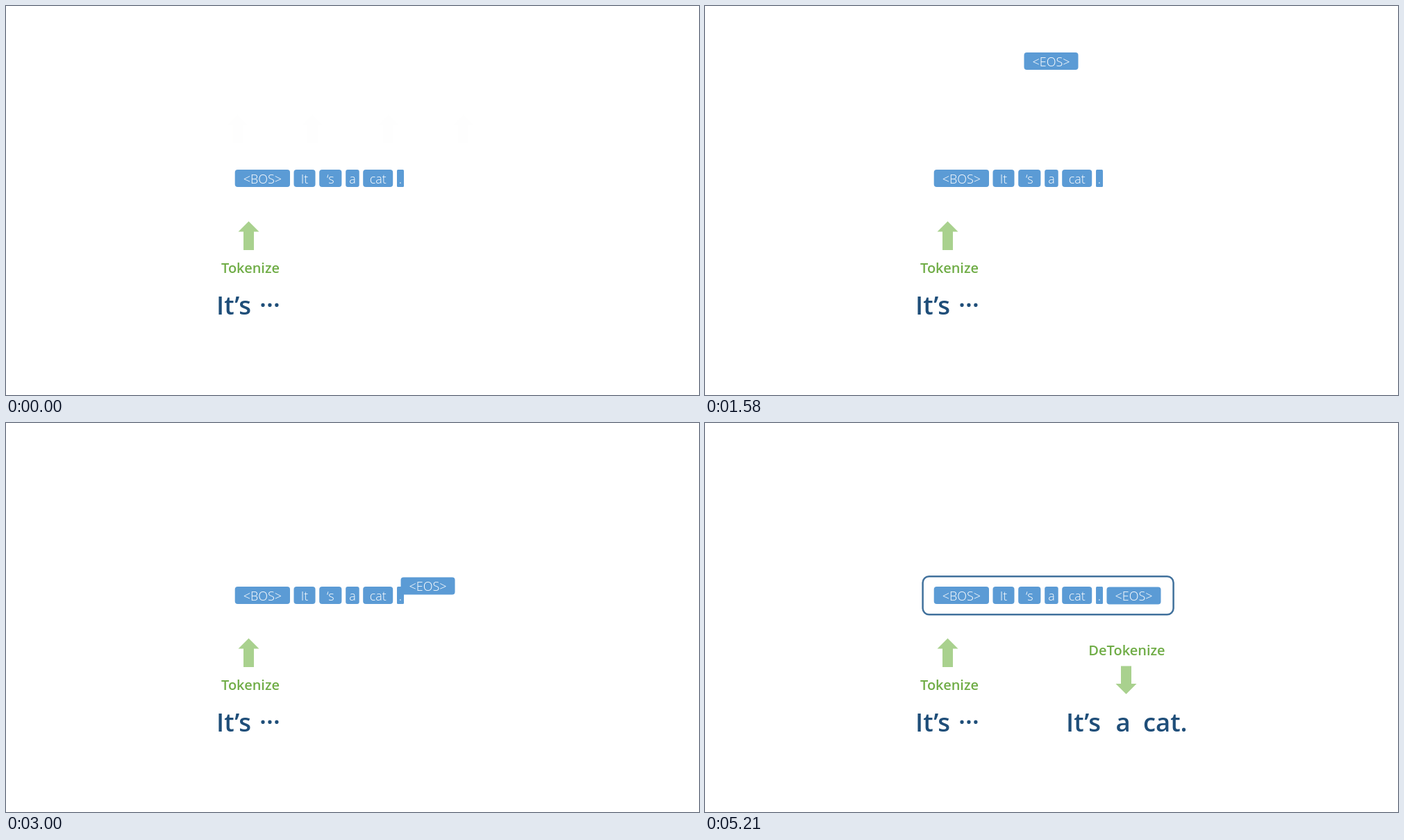
These frames come from a looping animation (998 px wide and 561 px high, 5.24 s). An HTML page:

```html
<!DOCTYPE html>
<html lang="en">
<head>
<meta charset="utf-8">
<title>Tokenize and detokenize</title>
<style>
  html, body { margin: 0; width: 100%; height: 100%; overflow: hidden; background: #fff; }
  svg { display: block; width: 998px; height: 561px; font-family: "Open Sans", "Noto Sans", sans-serif; }
  .token rect { fill: #5b9bd5; }
  .token text { fill: #fff; font-size: 18px; font-weight: 300; text-anchor: middle; }
  .arrow { fill: #a9d18e; }
  .label { fill: #70ad47; font-size: 20px; font-weight: 600; text-anchor: middle; }
  .words { fill: #1f4e79; font-size: 36.5px; font-weight: 600; }
</style>
</head>
<body>
<svg id="stage" viewBox="0 0 998 561">
  <text class="label" x="352" y="385.3">Tokenize</text>
  <text class="words" y="445"><tspan x="303">It’s</tspan><tspan x="365" dy="-11.5">…</tspan></text>
  <rect id="frame" x="313.6" y="221.2" width="361" height="55" rx="9" fill="none" stroke="#41719c" stroke-width="2.5"/>
  <text id="label" class="label" x="607.5" y="335">DeTokenize</text>
  <text id="result" class="words" y="445"><tspan x="520">It’s</tspan><tspan x="591.5">a</tspan><tspan x="631">cat.</tspan></text>
</svg>
<script>
const LOOP = 5240;
const stage = document.getElementById("stage");
const [frame, label, result] = ["frame", "label", "result"].map(id => document.getElementById(id));

function add(parent, tag, attrs, text = "") {
  const node = document.createElementNS("http://www.w3.org/2000/svg", tag);
  for (const key in attrs) node.setAttribute(key, attrs[key]);
  node.textContent = text;
  return parent.appendChild(node);
}

function token(text, x, width, radius = 4) {
  const group = add(stage, "g", { class: "token" });
  add(group, "rect", { x, y: 236, width, height: 25, rx: radius });
  add(group, "text", { x: x + width / 2, y: 255.6 }, text);
  return group;
}

// Arrow with its tip at (x, y); a negative length points down.
function arrow(parent, x, y, length) {
  const head = 15 * Math.sign(length);
  return add(parent, "path", {
    class: "arrow",
    d: `M${x} ${y}l15 ${head}h-7.5v${length - head}h-15v${head - length}h-7.5z`
  });
}

token("<BOS>", 329.7, 79.3);
token("It", 414.5, 31);
token("‘s", 451.2, 32.2);
token("a", 489.2, 19.5, 3);
token("cat", 514.2, 43);
token(".", 563, 10, 1.5);
arrow(stage, 349.5, 310.5, 41.5);

const upArrows = add(stage, "g");
for (let i = 0; i < 4; i++) arrow(upArrows, 333.7 + 108.2 * i, 156, 41.7);
const downArrow = arrow(stage, 606.5, 391, -40.5);
const eos = token("<EOS>", 459.5, 78);

const ramp = (t, start, length) => Math.min(1, Math.max(0, (t - start) / length));
const sine = p => (1 - Math.cos(Math.PI * p)) / 2;
const fade = (node, opacity) => node.setAttribute("opacity", opacity);

function draw(now) {
  const t = now % LOOP;
  fade(upArrows, ramp(t, 0, 470) - ramp(t, 1450, 120));

  // The end token floats in, then travels to the end of the row.
  const rise = ramp(t, 540, 945);
  const travel = sine(ramp(t, 1696, 1605));
  fade(eos, rise);
  const y = -169 + 56 * (1 - rise) + 169.6 * travel;
  eos.setAttribute("transform", `translate(${119 * travel} ${y})`);

  [frame, label, downArrow, result].forEach((node, i) => fade(node, ramp(t, 3275 + 480 * i, 480)));
}

const start = performance.now();
function tick() {
  draw(performance.now() - start);
  requestAnimationFrame(tick);
}
tick();
</script>
</body>
</html>
```
